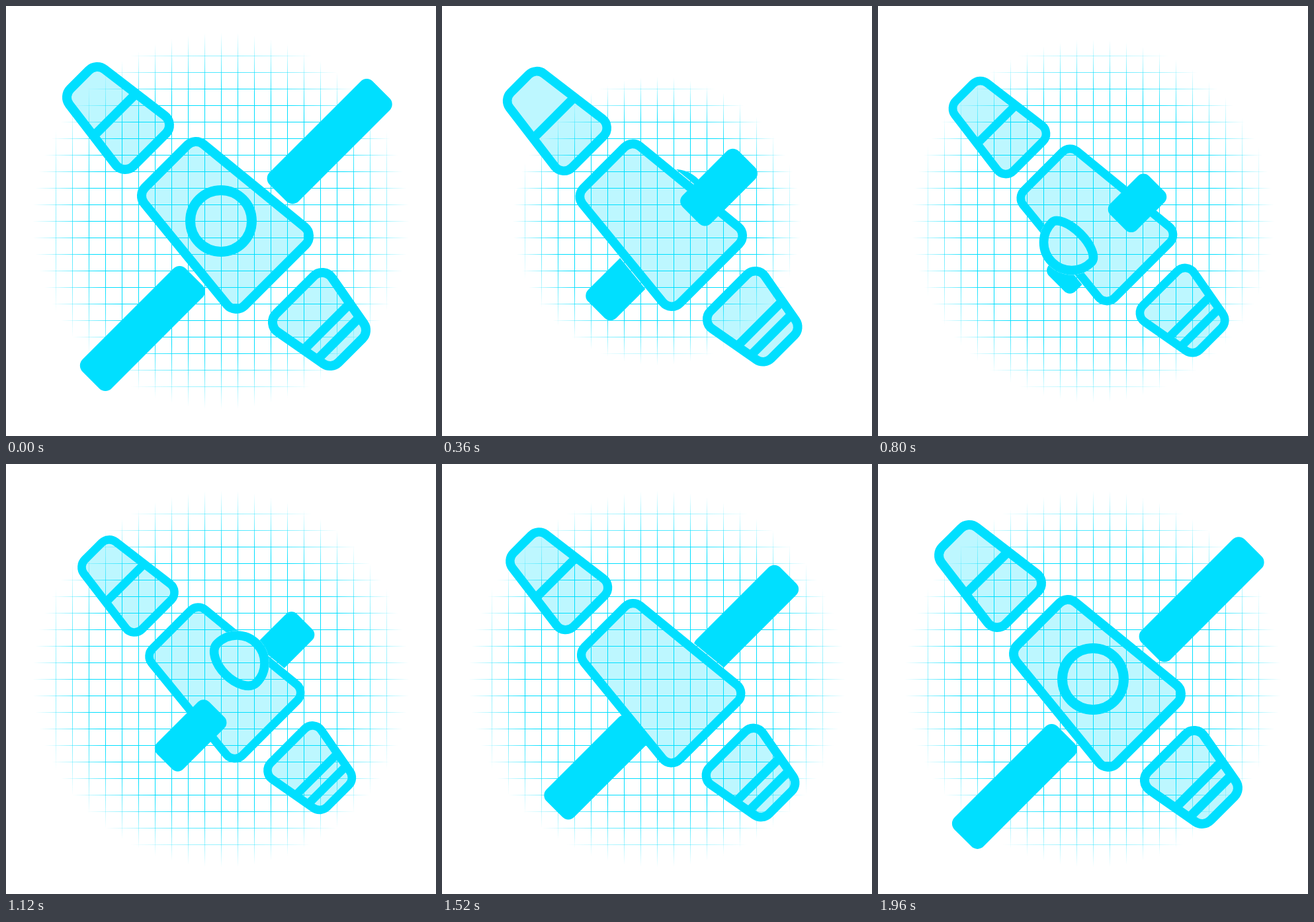
An HTML page with a canvas for the animation above (2000 ms loop, 650 px wide and 650 px high).

```html
<!DOCTYPE html>
<html lang="en">
<head>
<meta charset="utf-8">
<title>Spinning satellite</title>
<style>
  html, body { margin: 0; width: 100%; height: 100%; overflow: hidden; background: #fff; }
  canvas { position: absolute; left: 0; top: 0; }
</style>
</head>
<body>
<canvas id="grid" width="650" height="650"></canvas>
<canvas id="craft" width="650" height="650"></canvas>
<script>
const SIZE = 650, MID = 325, STEP = 40, FRAMES = 50;
const cyan = alpha => `rgba(0,223,255,${alpha})`;
const grid = document.getElementById('grid').getContext('2d');
const craft = document.getElementById('craft').getContext('2d');

const lerp = (a, b, k) => a + (b - a) * k;
const easeInOut = k => k < .5 ? 4 * k ** 3 : 1 - 4 * (1 - k) ** 3;

function drawGrid(zoom) {
  const fade = grid.createRadialGradient(MID, MID, 0, MID, MID, 285 * zoom);
  fade.addColorStop(0, cyan(1));
  fade.addColorStop(.7, cyan(1));
  fade.addColorStop(1, cyan(0));
  grid.clearRect(0, 0, SIZE, SIZE);
  grid.fillStyle = fade;
  for (let p = 75; p <= 575; p += 25) {
    grid.fillRect(p, 0, 1, SIZE);
    grid.fillRect(0, p, SIZE, 1);
  }
}

// Trapezoid along the axis with round corners; x and h locate the corner centres.
function trapezoid(x0, h0, x1, h1, r = 18) {
  const m = (h1 - h0) / (x1 - x0), side = r * Math.hypot(1, m);
  const a = h0 - m * r + side, b = h1 + m * r + side;
  const l = x0 - r, e = x1 + r, p = new Path2D();
  p.moveTo(l, 0);
  p.arcTo(l, -a, e, -b, r);
  p.arcTo(e, -b, e, b, r);
  p.arcTo(e, b, l, a, r);
  p.arcTo(l, a, l, -a, r);
  p.closePath();
  return p;
}

// Hides what lies behind (plus a thin gap), leaves a light tint and draws the outline.
function shell(path, width = 14, gap = 0) {
  craft.globalCompositeOperation = 'destination-out';
  craft.fill(path);
  craft.lineWidth = width + 2 * gap;
  craft.stroke(path);
  craft.globalCompositeOperation = 'source-over';
  craft.fillStyle = cyan(.26);
  craft.fill(path);
  craft.fillStyle = cyan(1);
  craft.lineWidth = width;
  craft.stroke(path);
}

function bar(x, h) {
  craft.fillRect(x - 7, -h, 14, 2 * h);
}

function panel(side, open) {
  const near = lerp(8, 102.7, open) - 13, far = lerp(8, 297.3, open) + 13;
  craft.beginPath();
  craft.roundRect(0, (side > 0 ? -far : near) - 1.2, 62, far - near, 13);
  craft.fill();
}

function dome(side, turn) {
  const r = 46.5, flat = r * (1 - .85 * turn), y = -side * 75 * turn;
  const p = new Path2D();
  p.ellipse(0, y, r, side > 0 ? r : flat, 0, Math.PI, 2 * Math.PI);
  p.ellipse(0, y, r, side > 0 ? flat : r, 0, 0, Math.PI);
  p.closePath();
  shell(p, 15);
}

const body = trapezoid(-99, 45.3, 97.6, 65.1);
const nose = trapezoid(-284.3, 19.8, -170.4, 34.6);
const tail = trapezoid(176, 40.3, 258.8, 25.5);

function drawCraft(scale, phase) {
  craft.setTransform(1, 0, 0, 1, 0, 0);
  craft.clearRect(0, 0, SIZE, SIZE);
  craft.translate(MID, MID);
  craft.rotate(Math.PI / 4);
  craft.scale(scale, scale);
  craft.strokeStyle = craft.fillStyle = cyan(1);
  craft.lineJoin = 'round';

  // Phase counts quarter turns: dome in front at 0, up at 1, behind at 2, down at 3.
  const open = Math.abs(phase < 2 ? 1 - phase : phase - 3);
  const first = phase > 1 && phase <= 3 ? -1 : 1;
  const frontSide = phase < 2 ? -first : first;
  const domeSide = phase < 2 ? 1 : -1;
  const domeBehind = phase >= 1 && phase <= 3;

  panel(-frontSide, open);
  if (domeBehind) dome(domeSide, 1 - open);
  shell(body, 14, 1);
  panel(frontSide, open);
  if (!domeBehind) dome(domeSide, 1 - open);

  shell(nose);
  bar(-227, 44);
  shell(tail);
  bar(226, 48);
  bar(251, 44);
}

function draw(now) {
  const n = Math.floor(now / STEP) % FRAMES;
  const pulse = n < 24 ? 1 - Math.abs(n / 12 - 1) : 0;
  drawGrid(1 - .25 * easeInOut(pulse));
  drawCraft(.95 + .05 * Math.cos(2 * Math.PI * n / FRAMES), Math.min(n % 25, 24) / 6 % 4);
}

const start = performance.now();
function tick() {
  draw(performance.now() - start);
  requestAnimationFrame(tick);
}
tick();
</script>
</body>
</html>
```
